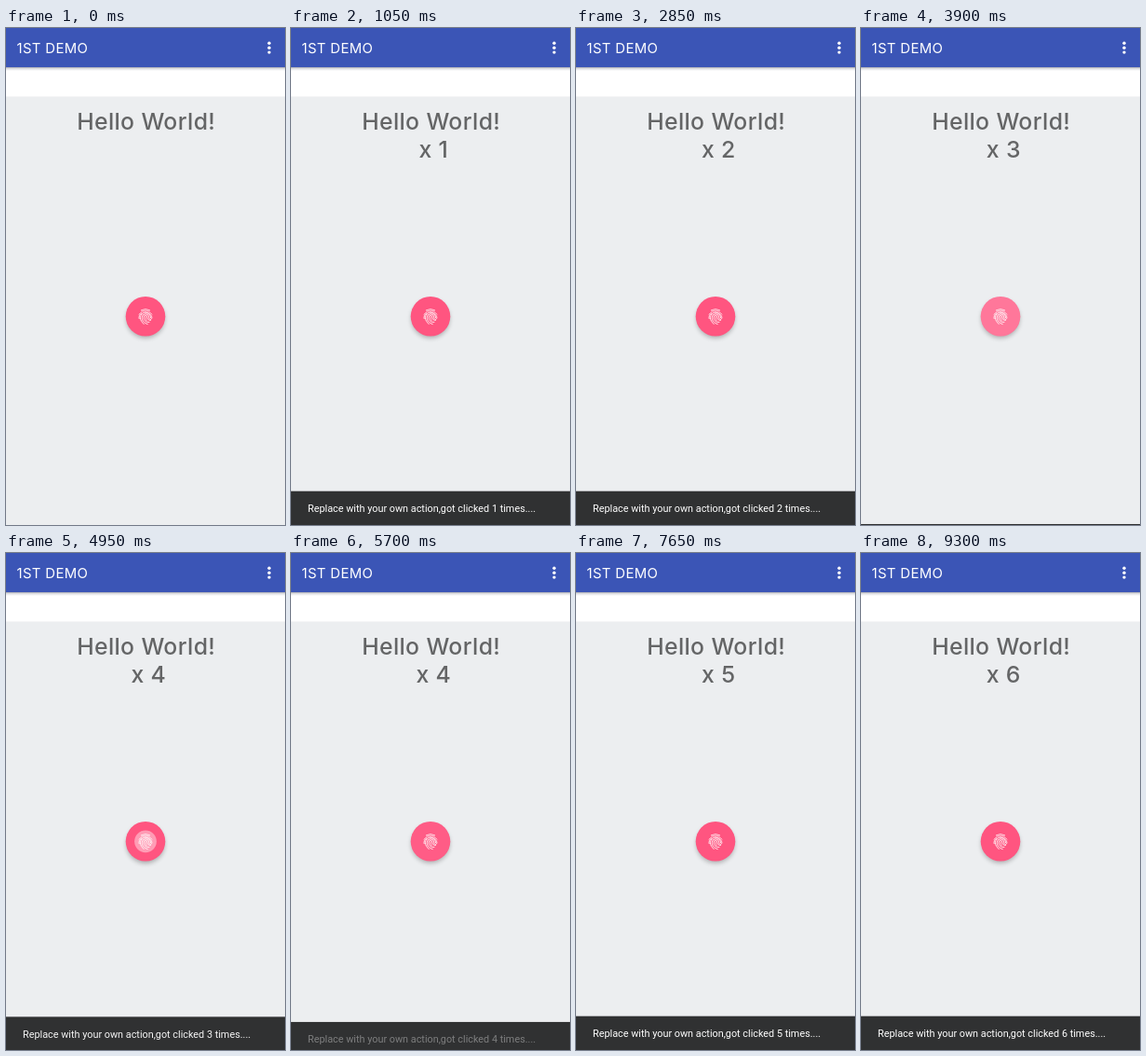
An HTML page that plays this animation: 300x533 px, repeating every 9.75 s.

```html
<!DOCTYPE html>
<html lang="en">
<head>
<meta charset="utf-8">
<title>Click counter</title>
<style>
  html, body { margin: 0; width: 100%; height: 100%; overflow: hidden; background: #eceef0; }
  svg { display: block; width: 100%; height: 100%; }
  .ui { font-family: Inter, sans-serif; letter-spacing: .35px; }
  .big { font-size: 24.8px; font-weight: 500; fill: #646566; text-anchor: middle; }
  .note { font: 10.85px Roboto, sans-serif; fill: #fff; }
</style>
</head>
<body>
<svg viewBox="0 0 300 533">
  <defs>
    <linearGradient id="edge" x2="0" y2="1">
      <stop offset="0" stop-color="#a2a4ad"/>
      <stop offset=".4" stop-color="#dfe0e3"/>
      <stop offset="1" stop-color="#fff"/>
    </linearGradient>
    <filter id="soft" x="-50%" y="-50%" width="200%" height="200%">
      <feGaussianBlur id="blur" stdDeviation="2.4"/>
    </filter>
    <clipPath id="disc"><circle cx="150" cy="309.3" r="21.3"/></clipPath>
  </defs>

  <rect width="300" height="533" fill="#eceef0"/>
  <rect y="42" width="300" height="31.5" fill="#fff"/>
  <rect y="42" width="300" height="4" fill="url(#edge)"/>
  <rect width="300" height="42" fill="#3b55b6"/>
  <text class="ui" x="11.6" y="27" font-size="14.9" fill="#fff">1ST DEMO</text>
  <g fill="#fff">
    <circle cx="283" cy="16.3" r="1.7"/>
    <circle cx="283" cy="21.2" r="1.7"/>
    <circle cx="283" cy="26.1" r="1.7"/>
  </g>

  <text class="ui big" x="150.7" y="109.3">Hello World!</text>
  <text class="ui big" id="count" x="153.3" y="139"></text>

  <circle id="shadow" cx="150" cy="312" r="20.6" filter="url(#soft)"/>
  <circle cx="150" cy="309.3" r="21.3" fill="#ff5580"/>
  <circle id="ripple" cx="150" cy="309.3" fill="#fff" clip-path="url(#disc)"/>
  <g transform="translate(140.4 299.3) scale(.8 .85)" fill="none" stroke="#fff" stroke-linecap="round">
    <path d="M6.2 4Q12 1 17.8 4"/>
    <path d="M3.5 9.2C6 6 9 5 12 5S18 6 20.5 9.2"/>
    <path d="M9.8 21.5C6.8 18.6 5 16.5 5 13.4A7 6.4 0 0 1 19 13.4"/>
    <path d="M14.8 21.5C10 20.2 7.2 17 7.2 13.4A4.8 4.4 0 0 1 16.8 13.4C17 16 20 16.5 20.6 13.4C20.4 9.8 16.5 7.2 12 7.2"/>
    <path d="M17 19C13 19.4 9.6 17 9.5 13.4A2.5 2.4 0 0 1 14.5 13.4C14.7 15.6 16.4 17 19 16.6"/>
    <path d="M12 13.2C12 15 12.6 16 13.5 16.9"/>
    <path d="M3.4 14.5C2.8 11.8 4 9.4 6.4 8.2"/>
  </g>

  <g id="bar">
    <rect width="300" height="37" fill="#303132"/>
    <text class="note" id="note" x="18" y="22.5"></text>
  </g>
</svg>
<script>
const LOOP = 9750, BAR_TOP = 496.7, BAR_H = 36.3, SLIDE = 474;
const CLICKS = [110, 1650, 3300, 4890, 6510, 8130];
const RELEASE = 20, HANDOVER = 552, GLOW = 0.415;

const $ = id => document.getElementById(id);
const [count, note, bar, ripple, shadow, blur] =
  ['count', 'note', 'bar', 'ripple', 'shadow', 'blur'].map($);

const clamp = x => Math.min(1, Math.max(0, x));
const span = (t, from, to) => clamp((t - from) / (to - from));
const cosine = p => (1 - Math.cos(Math.PI * p)) / 2;

// cubic-bezier(.4, 0, .2, 1)
function glide(x) {
  let lo = 0, hi = 1;
  for (let i = 0; i < 24; i++) {
    const s = (lo + hi) / 2, r = 1 - s;
    if (1.2 * r * r * s + 0.6 * r * s * s + s * s * s < x) lo = s; else hi = s;
  }
  return 3 * (1 - lo) * lo * lo + lo ** 3;
}

function drawBar(n, shown, alpha) {
  bar.setAttribute('transform', `translate(0 ${BAR_TOP + BAR_H * (1 - shown)})`);
  bar.setAttribute('visibility', n > 0 && shown > 0.001 ? 'visible' : 'hidden');
  note.textContent = `Replace with your own action,got clicked ${n} times....`;
  note.setAttribute('opacity', alpha);
}

function draw(t) {
  const n = CLICKS.filter(c => t >= c).length;
  const dt = n ? t - CLICKS[n - 1] : -1;
  const clicks = dt < RELEASE ? n - 1 : n;
  count.textContent = clicks > 0 ? 'x ' + clicks : '';

  // The previous bar leaves before the new one enters.
  const enter = n > 1 ? HANDOVER : 90;
  if (dt >= enter) {
    drawBar(n, glide(span(dt, enter, enter + SLIDE)),
      cosine(span(dt, enter + 118, enter + 458)));
  } else {
    drawBar(n - 1, 1 - glide(span(dt, RELEASE, RELEASE + SLIDE)),
      1 - cosine(span(dt, RELEASE, RELEASE + 290)));
  }

  const grow = span(dt, 0, 210);
  const glow = 1 - span(dt, 310, 870);
  ripple.setAttribute('r', 22 * Math.sqrt(grow));
  ripple.setAttribute('opacity', GLOW * glow);

  const lift = grow * (1 - span(dt, 240, 520));
  shadow.setAttribute('cy', 312 + lift);
  shadow.setAttribute('opacity', 0.27 + 0.04 * lift);
  blur.setAttribute('stdDeviation', 2.4 + 0.8 * lift);
}

const start = performance.now();
function tick() {
  draw((performance.now() - start) % LOOP);
  requestAnimationFrame(tick);
}
tick();
</script>
</body>
</html>
```
